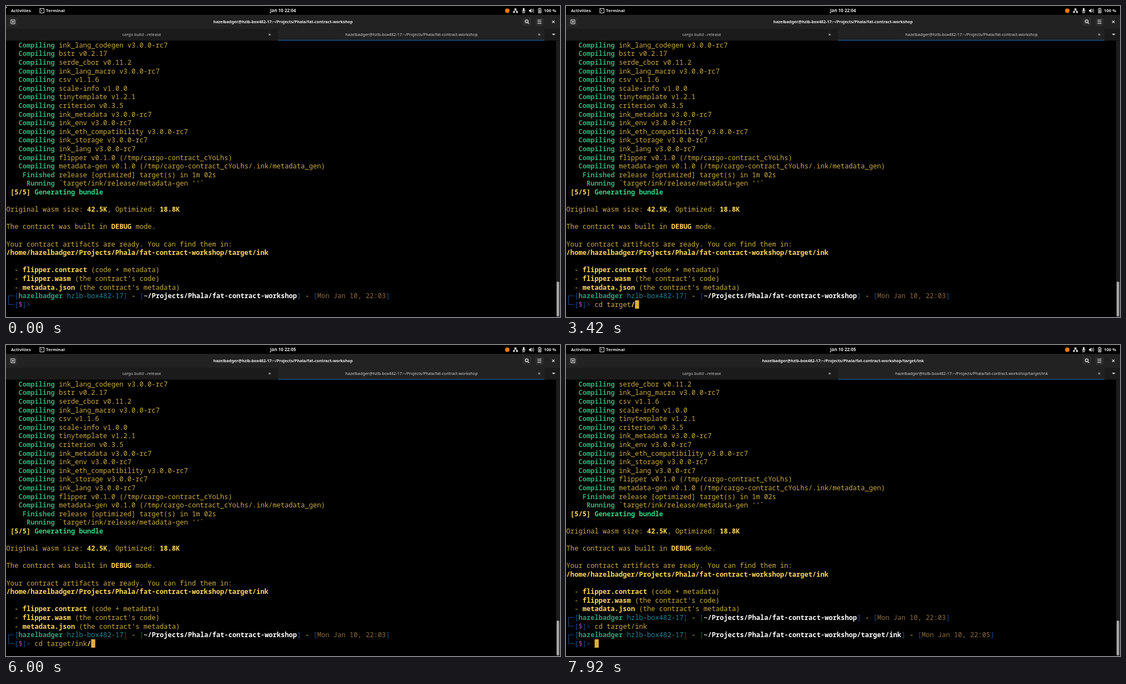
Animation, 998 px wide and 561 px high, one loop 8 s. Source, as an HTML page with a canvas:

```html
<!DOCTYPE html>
<html lang="en">
<head>
<meta charset="utf-8">
<title>Terminal</title>
<style>
html, body { margin: 0; width: 100%; height: 100%; overflow: hidden; background: #000; }
canvas { display: block; }
</style>
</head>
<body>
<canvas id="stage" width="998" height="561"></canvas>
<script>
const ctx = document.getElementById('stage').getContext('2d');
const LOOP = 8000, CELL = 7.275, ROW = 15.6, LEFT = 0.6, TOP = 62.6;
const USER = 'hazelbadger', HOST = 'hzlb-box482-17';
const DIR = '~/Projects/Phala/fat-contract-workshop';

// Capital keys are bold
const COLORS = {
  y: '#cbab43', Y: '#ffd857', G: '#2bae74', L: '#35d584', W: '#ffffff',
  b: '#164f96', U: '#26a27c', a: '#0c1a26', h: '#22869a', d: '#8a6a3a', m: '#a347ba'
};

const crates = [
  'ink_lang_codegen v3.0.0-rc7', 'bstr v0.2.17', 'serde_cbor v0.11.2',
  'ink_lang_macro v3.0.0-rc7', 'csv v1.1.6', 'scale-info v1.0.0',
  'tinytemplate v1.2.1', 'criterion v0.3.5', 'ink_metadata v3.0.0-rc7',
  'ink_env v3.0.0-rc7', 'ink_eth_compatibility v3.0.0-rc7',
  'ink_storage v3.0.0-rc7', 'ink_lang v3.0.0-rc7',
  'flipper v0.1.0 (/tmp/cargo-contract_cYoLhs)',
  'metadata-gen v0.1.0 (/tmp/cargo-contract_cYoLhs/.ink/metadata_gen)'
];
const output = [
  ...crates.map(c => `{G}   Compiling {y}${c}`),
  '{G}    Finished {y}release [optimized] target(s) in 1m 02s',
  "{G}     Running {y}`target/ink/release/metadata-gen ''`",
  '{Y} [5/5] {L}Generating bundle',
  '',
  '{y}Original wasm size: {Y}42.5K{y}, Optimized: {Y}18.8K',
  '',
  '{y}The contract was built in {Y}DEBUG{y} mode.',
  '',
  '{y}Your contract artifacts are ready. You can find them in:',
  `{Y}/home/${USER}/Projects/Phala/fat-contract-workshop/target/ink`,
  '',
  '{y}  - {Y}flipper.contract{y} (code + metadata)',
  "{y}  - {Y}flipper.wasm{y} (the contract's code)",
  "{y}  - {Y}metadata.json{y} (the contract's metadata)"
];

// [time, command so far]
const typing = [
  [0, ''], [1990, 'c'], [2075, 'cd'], [2245, 'cd '], [2830, 'cd t'], [2915, 'cd ta'],
  [3080, 'cd tar'], [3330, 'cd target{Y}/'], [3750, 'cd target/i'],
  [4410, 'cd target/in'], [4660, 'cd target/ink'], [4830, 'cd target/ink{Y}/']
];
const ENTER = 6160, CLOCK = 4660, POINTER_HIDES = 1990;
const cursorOff = [[0, 245], [825, 1415], [5495, 5990], [6825, 7745]];

const promptHead = (dir, time) =>
  `  {b}[{U}${USER}{a}@{h}${HOST}{b}]{y} - {b}[{W}${dir}{b}]{y} - {b}[{d}Mon Jan 10, ${time}{b}]`;
const PROMPT_TAIL = '  {b}[{m}${b}]> {y}';

function rect(x, y, w, h, color, radius = 0) {
  ctx.fillStyle = color;
  ctx.beginPath();
  ctx.roundRect(x, y, w, h, radius);
  ctx.fill();
}

function trace(points) {
  ctx.beginPath();
  for (let i = 0; i < points.length; i += 2) ctx.lineTo(points[i], points[i + 1]);
}

function line(color, width, ...points) {
  ctx.strokeStyle = color;
  ctx.lineWidth = width;
  trace(points);
  ctx.stroke();
}

function shape(color, ...points) {
  ctx.fillStyle = color;
  trace(points);
  ctx.fill();
}

function cross(x, y, r, color) {
  line(color, 1.1, x - r, y - r, x + r, y + r);
  line(color, 1.1, x - r, y + r, x + r, y - r);
}

function label(text, x, y, color, size, weight = 400, align = 'center') {
  ctx.font = `${weight} ${size}px "Noto Sans", sans-serif`;
  ctx.textAlign = align;
  ctx.fillStyle = color;
  ctx.fillText(text, x, y);
}

// Draws one marked-up row and returns the column where it ends
function drawRow(markup, row) {
  let column = 0, key = 'y';
  ctx.textAlign = 'left';
  markup.split(/\{(\w)\}/).forEach((part, i) => {
    if (i % 2) { key = part; return; }
    ctx.font = `${key < 'a' ? 700 : 400} 12.125px "Noto Sans Mono", monospace`;
    ctx.fillStyle = COLORS[key];
    ctx.fillText(part, LEFT + column * CELL, TOP + 12.1 + row * ROW);
    column += part.length;
  });
  return column;
}

function drawPrompt(dir, time, command, row) {
  const y = TOP + (row + 0.5) * ROW;
  line(COLORS.b, 1, 14.5, y, 4.5, y, 4.5, y + ROW, 14.5, y + ROW);
  drawRow(promptHead(dir, time), row);
  return drawRow(PROMPT_TAIL + command, row + 1);
}

function drawCursor(column) {
  const x = LEFT + column * CELL;
  rect(x, 530.8, 7.4, 15.2, '#d8aa32');
  ctx.strokeStyle = '#e6c25c';
  ctx.lineWidth = 0.8;
  ctx.strokeRect(x + 1.9, 533.5, 3.6, 10);
}

function drawTopBar(t) {
  const white = '#e6e6e6';
  label('Activities', 9, 11, white, 7.7, 600, 'left');
  label('Terminal', 72, 11, white, 7.7, 600, 'left');
  label(`Jan 10 22:0${t < CLOCK ? 4 : 5}`, 499, 11, white, 8, 600);
  label('100 %', 969, 11, white, 7.7, 600, 'left');
  line(white, 1, 61, 4.5, 68.5, 4.5, 68.5, 12.5, 61, 12.5, 61, 4);
  line(white, 1, 62.5, 6.5, 64.5, 8.2, 62.5, 10);
  rect(899, 4.5, 8, 8, '#f57900', 4);
  rect(916, 4.5, 3.5, 3, white);
  rect(913.5, 9.5, 3, 3, white);
  rect(919, 9.5, 3, 3, white);
  line(white, 0.8, 915, 10, 915, 8.5, 920.5, 8.5, 920.5, 10);
  rect(931, 4, 3.2, 5, white);
  line(white, 1, 929.5, 8, 930.5, 10, 934.5, 10, 935.5, 8);
  rect(930, 11.5, 5, 1.2, white);
  shape(white, 942, 7, 944, 7, 946.5, 4.5, 946.5, 12.5, 944, 10, 942, 10);
  line(white, 1, 948, 6, 949, 8.5, 948, 11);
  line(white, 0.8, 949.5, 4.5, 951, 8.5, 949.5, 12.5);
  line(white, 1, 959, 5, 964, 5, 964, 12.5, 959, 12.5, 959, 4.5);
  rect(960.5, 3.5, 2, 1.5, white);
  rect(960.5, 7, 2, 4.5, white);
  if (t < POINTER_HIDES) line('#ffffff', 1, 0, 4, 1.5, 1);
}

function drawHeader(dir) {
  const white = '#eeeeee', gray = '#a8a8a8';
  const title = `${USER}@${HOST}:${dir}`;
  rect(0, 16, 998, 25, '#222222');
  rect(0, 41, 998, 21.5, '#1b1b1b');
  rect(490, 41, 480, 21.5, '#222222');
  rect(490, 61.2, 480, 1.4, '#15539e');
  for (const x of [5, 931, 953.5]) rect(x, 21, 15, 15, '#2c2c2c', 2.5);
  line(white, 1, 9, 25, 16, 25, 16, 32, 9, 32, 9, 24.5);
  line(white, 1, 12.5, 26.5, 12.5, 30.5);
  line(white, 1, 10.5, 28.5, 14.5, 28.5);
  ctx.lineWidth = 1.2;
  ctx.beginPath();
  ctx.arc(938, 27.8, 2.6, 0, 7);
  ctx.stroke();
  line(white, 1.3, 940, 30, 942, 32);
  for (const y of [25.5, 28.5, 31.5]) line(white, 1.1, 957.5, y, 964.5, y);
  cross(986, 28.5, 2.2, white);
  label(title, 499, 31.3, white, 7.25, 600);
  label('cargo build --release', 244.5, 54, '#c4c4c4', 7.3);
  label(title, 730.5, 54, '#d0d0d0', 7.3);
  cross(475, 51.5, 1.7, gray);
  cross(960.5, 51.5, 1.7, gray);
  shape(white, 983.5, 50, 989.5, 50, 986.5, 53);
}

function draw(t) {
  const done = t >= ENTER;
  const newDir = DIR + '/target/ink';
  rect(0, 0, 998, 561, '#000000');
  output.slice(done ? 2 : 0).forEach(drawRow);

  let column;
  if (done) {
    drawPrompt(DIR, '22:03', 'cd target/ink', 27);
    column = drawPrompt(newDir, '22:05', '', 29);
  } else {
    const [, command] = typing.findLast(([time]) => t >= time);
    column = drawPrompt(DIR, '22:03', command, 29);
  }
  if (!cursorOff.some(([from, to]) => t >= from && t < to)) drawCursor(column);

  drawTopBar(t);
  drawHeader(done ? newDir : DIR);
  rect(991, 62.5, 7, 498.5, '#1c1c1c');
  rect(992, 497, 4.5, 63, '#a6a6a6', 2);
}

const start = performance.now();
function frame() {
  draw((performance.now() - start) % LOOP);
  requestAnimationFrame(frame);
}
frame();
</script>
</body>
</html>
```
